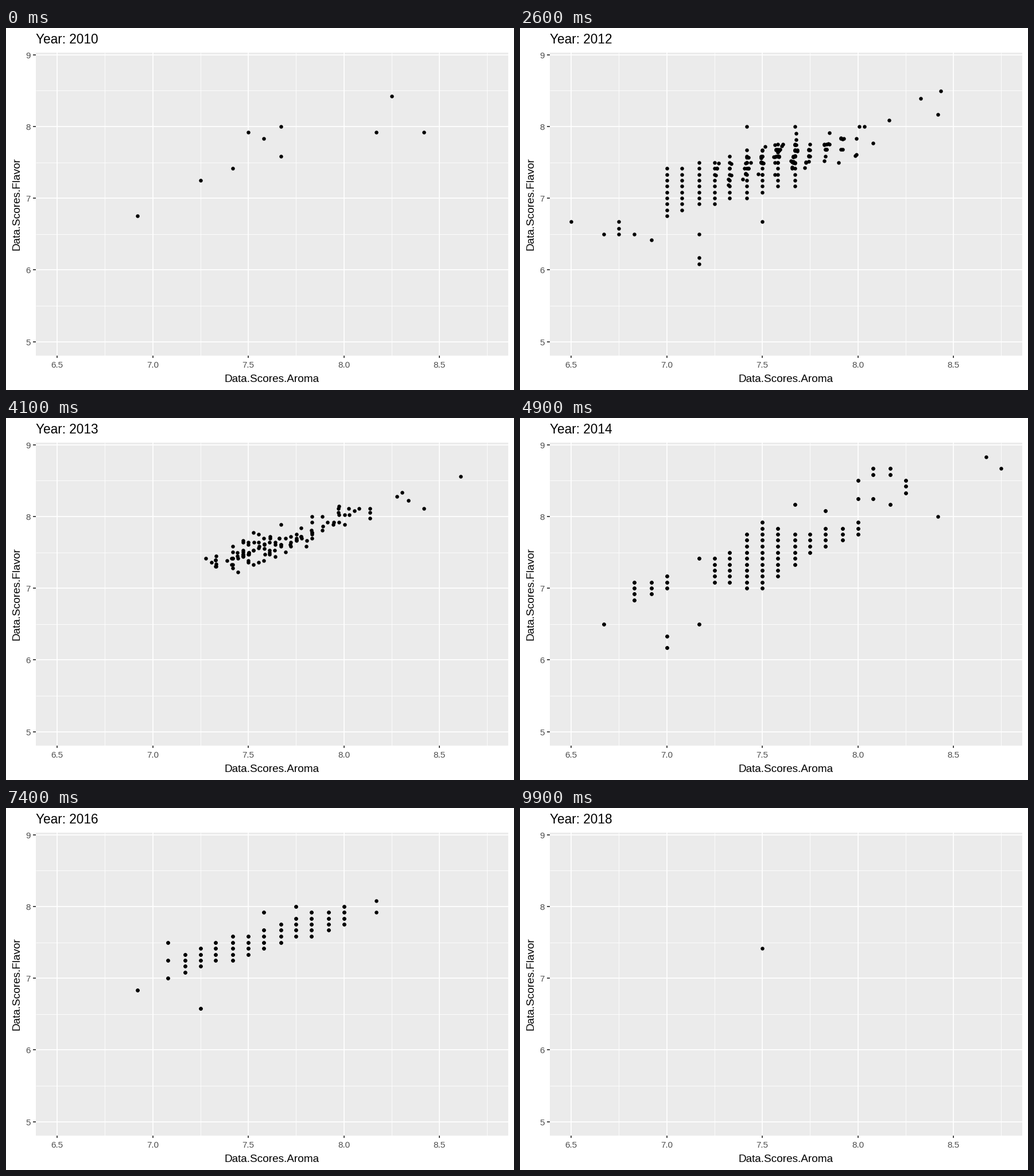
Write a matplotlib script that moves like this. It is 885 px wide and 632 px high and loops after 10000 ms.

```python
import numpy as np
import matplotlib.pyplot as plt
from matplotlib.animation import FuncAnimation
from matplotlib.patches import Rectangle

W, H, DPI = 885, 632, 100
FRAMES, INTERVAL = 100, 100
plt.rcParams["font.family"] = "Liberation Sans"
rng = np.random.default_rng(7)

# Scores sit on a grid of twelfths, counted from 7.


def ranked(p, noise=1.0):
    """Rows from best to worst total, slightly shuffled."""
    return p[np.argsort(-(p.sum(1) + rng.normal(0, noise, len(p))))]


def cloud(n, mean, sd, slope, base, noise):
    """Seeded scores scattered around a line."""
    x = np.clip(rng.normal(mean, sd, n), mean - 2.5 * sd, mean + 2 * sd)
    y = base + slope * x + noise * np.clip(rng.normal(0, 1, n), -2, 2)
    return ranked(np.round(np.column_stack([x, y])))


def band(xs, slope, base, edge, bulge=0.0):
    """Every grid cell near a line; the band may swell around x = 6."""
    cells = []
    for x in xs:
        mid, half = base + slope * x, edge + bulge * np.exp(-((x - 6) / 2) ** 2)
        cells += [(x, y) for y in range(-12, 24) if abs(y - mid) <= half]
    return np.array(cells, float)


top11 = [(18, 18), (18, 15), (16, 12), (18, 12), (14, 12)]
top12 = [(17, 18), (14, 13), (17, 14), (12, 12), (16, 17)]
top13 = [(19, 17), (13, 14), (17, 14), (17, 12), (16, 13)]
top14 = [(20, 22), (21, 20), (17, 12)]
odd12 = [(-6, -4), (-4, -6), (-3, -4), (-3, -5), (-3, -6), (-2, -6), (-1, -7),
         (2, -6), (2, -10), (2, -11), (6, -4), (5, 12), (8, 12)]
odd14 = [(13, 20), (13, 19), (14, 20), (14, 19), (15, 18), (15, 17), (15, 16),
         (12, 18), (12, 15), (13, 15), (14, 14), (10, 13), (8, 14),
         (2, 5), (2, -6), (-4, -6), (0, -8), (0, -10)]
odd16 = [(9, 12), (7, 11), (1, 6), (1, 3), (1, 0), (-1, -2), (3, -5)]

y10 = [(15, 17), (14, 11), (17, 11), (8, 12), (6, 11),
       (7, 10), (8, 7), (5, 5), (3, 3), (-1, -3)]
y11 = np.vstack([top11, cloud(20, 7, 3, 0.5, 4, 1.8)])
y12 = np.vstack([top12, cloud(115, 8, 2.5, 0.6, 2.6, 1.5),
                 band(range(0, 9), 0.6, 1, 4), odd12])
y13 = np.vstack([top13, cloud(115, 8, 2.5, 0.6, 2.6, 1.5)])
cells14 = np.vstack([band(np.r_[-2:1, 3:13], 0.75, 0.8, 1.7, 4), odd14])
y14 = np.vstack([top14, ranked(cells14).repeat(2, axis=0)])
y15 = np.vstack([[(17, 15), (12, 10)], cloud(95, 7, 2.4, 0.6, 3, 1.4)])
cells16 = np.vstack([band(range(2, 13), 0.8, 1, 2), odd16])
y16 = np.vstack([[(14, 13), (14, 11)], ranked(cells16).repeat(2, axis=0)])
y17 = np.vstack([[(12, 12), (12, 11)], cloud(46, 7, 2.2, 0.75, 1, 1.3)])

years = [np.round(7 + np.array(y, float) / 12, 2)
         for y in (y10, y11, y12, y13, y14, y15, y16, y17, [(6, 5)])]
STEP = (FRAMES - 1) / (len(years) - 1)
keys = [int(np.ceil(k * STEP - 0.5)) for k in range(len(years))]


def points(f):
    """Rows move to the same row of the next year; surplus rows wait."""
    if f >= keys[-1]:
        return years[-1]
    k = int(np.searchsorted(keys, f, side="right")) - 1
    a, b = years[k], years[k + 1]
    t = (f - keys[k]) / (keys[k + 1] - keys[k])
    n = min(len(a), len(b))
    return np.vstack([a[:n] + (b[:n] - a[:n]) * t, a[n:]])


fig = plt.figure(figsize=(W / DPI, H / DPI), dpi=DPI, facecolor="white")
ax = fig.add_axes([0, 0, 1, 1])
ax.set_xlim(0, W)
ax.set_ylim(H, 0)
ax.axis("off")

PT = 72 / DPI
L, R, T, B = 51.5, 875.3, 43, 571.5
ax.add_patch(Rectangle((L, T), R - L, B - T, fc="#EBEBEB", ec="none", zorder=0))


def px(x):
    return 89 + (x - 6.5) * 333


def py(y):
    return 46.6 + (9 - y) * 125.27


def line(xs, ys, width, color="white"):
    ax.plot(xs, ys, color=color, lw=width * PT, solid_capstyle="butt", zorder=1)


def label(x, y, s, size, color="black", **kw):
    return ax.text(x, y, s, fontsize=size * PT, color=color, va="baseline", **kw)


for x in np.arange(6.75, 9, 0.5):
    line([px(x)] * 2, [T, B], 0.9)
for y in np.arange(5.5, 9):
    line([L, R], [py(y)] * 2, 0.9)
for x in np.arange(6.5, 9, 0.5):
    line([px(x)] * 2, [T, B], 1.75)
    line([px(x)] * 2, [B, B + 4.7], 1.75, "#333333")
    label(px(x), 592.7, f"{x:.1f}", 15.2, "#4D4D4D", ha="center")
for y in range(5, 10):
    line([L, R], [py(y)] * 2, 1.75)
    line([L - 4.7, L], [py(y)] * 2, 1.75, "#333333")
    label(43, py(y) + 6, str(y), 15.2, "#4D4D4D", ha="right")

label((L + R) / 2 - 0.6, 617.5, "Data.Scores.Aroma", 19, ha="center")
label(24, (T + B) / 2, "Data.Scores.Flavor", 19, ha="center",
      rotation=90, rotation_mode="anchor")
title = label(L, 26.7, "", 22.6, ha="left")
dots, = ax.plot([], [], "o", color="black", ms=6.5 * PT, mew=0, zorder=3)


def draw(f):
    p = points(f)
    dots.set_data(px(p[:, 0]), py(p[:, 1]))
    title.set_text(f"Year: {2010 + round(f / STEP)}")
    return dots, title


anim = FuncAnimation(fig, draw, frames=FRAMES, interval=INTERVAL,
                     repeat=True, repeat_delay=0, blit=False)
plt.show()
```
